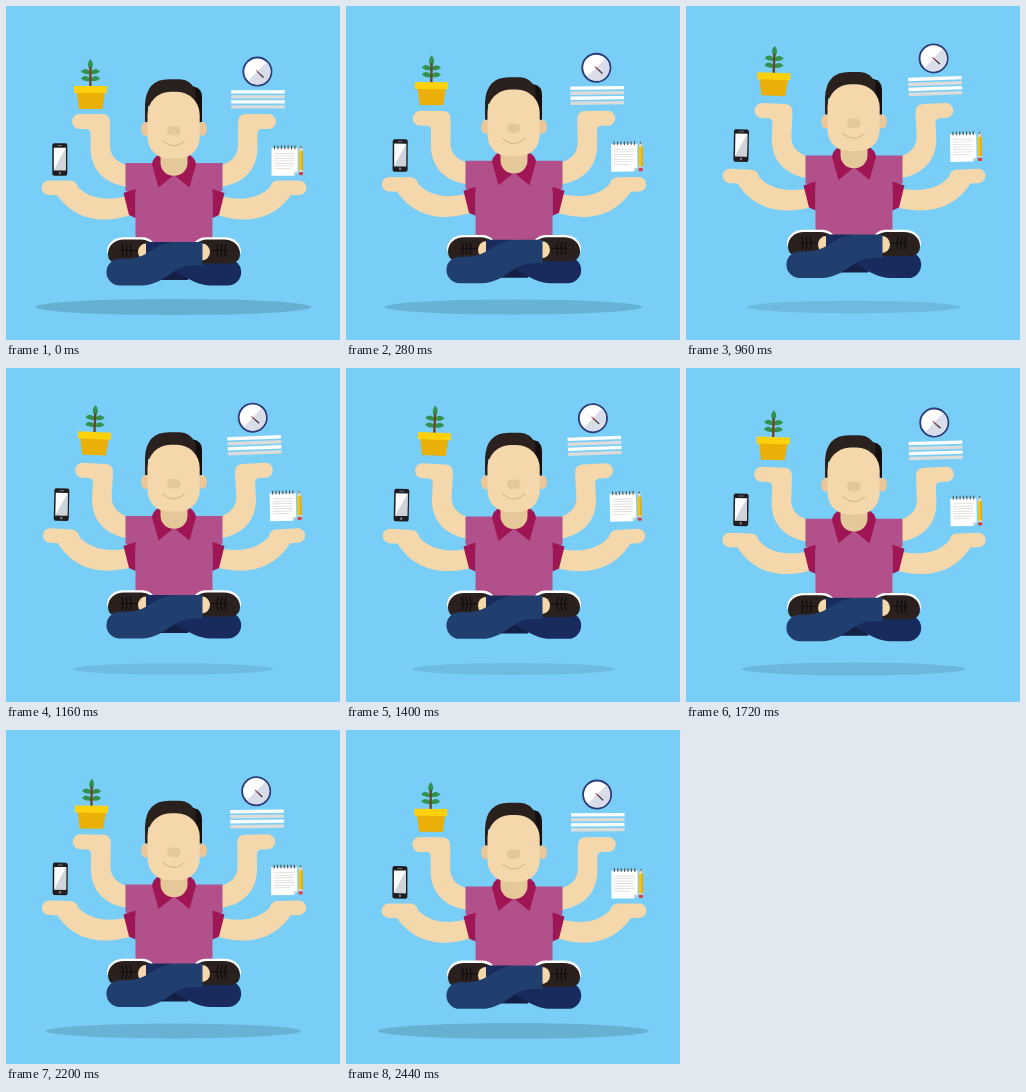
An HTML page with a canvas that plays this animation: 334x334 px, repeating every 2.52 s.

```html
<!DOCTYPE html>
<html lang="en">
<head>
<meta charset="utf-8">
<title>Multitasking meditation</title>
<style>
  html, body { margin: 0; width: 100%; height: 100%; overflow: hidden; background: #79cef7; }
  canvas { display: block; width: 100vw; height: 100vh; }
</style>
</head>
<body>
<canvas id="stage"></canvas>
<script>
const SIZE = 334, LOOP = 2520, STEP = 40, MID = 168, SWING = 0.065;
const SKIN = '#f4d7aa', SKIN_DARK = '#e5c89a', HAIR = '#2a211f';
const SHIRT = '#b1508a', COLLAR = '#a01553', JEANS = '#203f6e', JEANS_DARK = '#182b5c';

const canvas = document.getElementById('stage');
const ctx = canvas.getContext('2d');
const ratio = window.devicePixelRatio || 1;
canvas.width = canvas.height = SIZE * ratio;

function fill(color, d) {
  ctx.fillStyle = color;
  ctx.fill(new Path2D(d));
}

function line(color, width, d) {
  ctx.strokeStyle = color;
  ctx.lineWidth = width;
  ctx.stroke(new Path2D(d));
}

function box(color, x, y, w, h, r = 0) {
  ctx.fillStyle = color;
  ctx.beginPath();
  ctx.roundRect(x, y, w, h, r);
  ctx.fill();
}

function oval(color, x, y, rx, ry = rx) {
  ctx.fillStyle = color;
  ctx.beginPath();
  ctx.ellipse(x, y, rx, ry, 0, 0, Math.PI * 2);
  ctx.fill();
}

function group(draw) {
  ctx.save();
  draw();
  ctx.restore();
}

function mirror(draw) {
  group(() => {
    ctx.translate(MID * 2, 0);
    ctx.scale(-1, 1);
    draw();
  });
}

function bothSides(draw) {
  draw();
  mirror(draw);
}

function turn(x, y, angle) {
  ctx.translate(x, y);
  ctx.rotate(angle);
  ctx.translate(-x, -y);
}

function upperArm() {
  fill(SKIN, 'M73.5 108H96Q104 108 104 117V139C104 151 112 157 124 160V181C100 179 84.5 165 84.5 141V128Q84.5 123 80 123H73.5A7.5 7.5 0 0 1 73.5 108Z');
}

function lowerArm() {
  fill(SKIN, 'M42.8 174.5H64Q70 174.5 72 181C82 192 102 197 128 188V208C100 218 70 216 51 189H42.8A7.25 7.25 0 0 1 42.8 174.5Z');
}

function plant() {
  const leaf = '#33904d';
  fill(leaf, 'M84.4 53Q89.5 59 84.4 64Q79.3 59 84.4 53Z');
  for (const y of [65.5, 72.5]) {
    fill(leaf, `M84.4 ${y + 2}Q79 ${y + 4} 74.8 ${y}Q79 ${y - 5} 84.4 ${y}Q90 ${y - 5} 94 ${y}Q90 ${y + 4} 84.4 ${y + 2}Z`);
  }
  box('#6b4524', 83.2, 61, 2.4, 20);
  fill('#ebb008', 'M70.5 86H99L96.5 103H73Z');
  box('#fdd20c', 68, 80, 33, 7);
}

function phone() {
  box('#1f1d1f', 46.3, 137.3, 15, 32.5, 2);
  box('#fbfbfb', 47.8, 141.7, 12, 22.6);
  fill('#d0d3da', 'M59.8 141.7V164.3H47.8Z');
  box('#77777b', 51.5, 139.2, 4.5, 0.9);
  oval('#77777b', 53.8, 167, 1.3);
}

function clock() {
  oval('#2c3d7a', 251.4, 65.6, 15);
  oval('#ffffff', 251.4, 65.6, 13.1);
  ctx.fillStyle = '#d9dde9';
  ctx.beginPath();
  ctx.arc(251.4, 65.6, 13.1, -Math.PI / 4, Math.PI * 3 / 4);
  ctx.fill();
  line('#302a35', 1.2, 'M251.4 65.6L257.5 71.5');
  line('#c4504f', 1, 'M250 64.2L254 68');
}

function papers() {
  for (let i = 0; i < 4; i++) {
    box(i % 2 ? '#dcdcda' : '#ffffff', 225.2, 84.2 + i * 5, 53.6, 3.3);
  }
}

function notebook() {
  fill('#ffffff', 'M265.5 142H291.7V166L288 169.7H265.5Z');
  fill('#cfd2d6', 'M291.7 166H288V169.7Z');
  for (let i = 0; i < 7; i++) {
    box('#d8d6d2', 268.3, 147 + i * 2.5, i === 6 ? 16 : 20, 0.7);
    box('#5b5348', 268 + i * 3.4, 139.2, 1.1, 4, 0.5);
  }
  box('#f9c513', 293, 145, 4, 20);
  box('#e4a60f', 295.5, 145, 1.5, 20);
  fill('#f2d5aa', 'M293 145L295 139.6L297 145Z');
  fill('#39302c', 'M294.2 141.7L295 139.6L295.8 141.7Z');
  box('#d9d9d9', 293, 164.3, 4, 1.7);
  box('#d8403f', 293, 166, 4, 3.3, 1);
}

// An arm swings about the shoulder; what it holds floats further and tilts less.
function lift(p, side, arm, shoulder, load) {
  group(() => {
    const x = side < 0 ? shoulder.x : MID * 2 - shoulder.x;
    turn(x, shoulder.y, -side * SWING * p);
    side < 0 ? arm() : mirror(arm);
    ctx.translate(side * 1.5 * p, -3.6 * p);
    turn(load.x, load.y, side * (SWING - shoulder.tilt) * p);
    load.draw();
  });
}

const UPPER = { x: 148, y: 166, tilt: 0.045 };
const LOWER = { x: 132, y: 200, tilt: 0.025 };

function drawArms(p) {
  lift(p, -1, upperArm, UPPER, { x: 84.4, y: 80, draw: plant });
  lift(p, 1, upperArm, UPPER, { x: 252, y: 80, draw() { clock(); papers(); } });
  lift(p, -1, lowerArm, LOWER, { x: 53.8, y: 153.5, draw: phone });
  lift(p, 1, lowerArm, LOWER, { x: 281, y: 155, draw: notebook });
}

function torso() {
  fill(SHIRT, 'M119.5 157H216.5V185L206.5 188V238H129.5V188L119.5 185Z');
  bothSides(() => fill(COLLAR, 'M117.5 187L129.5 183V212L123 209Z'));
  bothSides(() => fill(COLLAR, 'M154.5 148Q147 151 146 158L152.5 181.5L168 169V160Z'));
  box(SKIN_DARK, 154.5, 143, 27, 26.7, [0, 0, 13, 13]);
}

function head() {
  fill('#15100f', 'M183 80.5H187.5Q196 82 196 91V116H183Z');
  fill(HAIR, 'M139 116V99Q140 73.3 163 73.3H174Q184 73.5 189.5 84V100H142V116Z');
  bothSides(() => oval('#eac698', 139.5, 123, 4.5, 7));
  box(SKIN, 141.5, 85.7, 52.2, 66.8, [23, 23, 21, 21]);
  box(SKIN_DARK, 161, 120, 13.5, 9.3, 4.5);
  ctx.lineCap = 'round';
  line('#d9b888', 1.1, 'M157 134.8Q168 144.5 178.5 134.8');
  ctx.lineCap = 'butt';
}

function shoe() {
  fill('#ffffff', 'M101 247C100.5 237 108 231.2 118 231.2H136Q143 231.2 147 236V246Z');
  fill(HAIR, 'M102 248C102 239 109 233.5 118 233.5H135Q141 233.5 145 237V257.5H110Q102 256 102 248Z');
  for (const x of [116, 120, 124]) line('#0f0c0d', 1.2, `M${x} 238Q${x + 2} 244 ${x} 251`);
  line('#0f0c0d', 0.9, 'M114 244.5H131');
  oval(SKIN, 140, 246, 8, 8.5);
}

function legs() {
  shoe();
  fill('#141f45', 'M150 262L168 256L186 262L182 274H154Z');
  fill(JEANS_DARK, 'M140 236H166C183 239 198 253 222 253A13.2 13.2 0 0 1 222 279.4H205C182 279.4 168 258 140 255Z');
  mirror(shoe);
  fill(JEANS, 'M113.7 252.8H121C143 252.8 148 236 171 236H196.5V259.5H186C166 260 158 279.4 136 279.4H113.7A13.3 13.3 0 0 1 113.7 252.8Z');
}

function render(now) {
  const time = Math.min(Math.floor((now % LOOP) / STEP) * STEP, LOOP - 2 * STEP);
  const p = 1 - Math.abs(time / (LOOP / 2) - 1);
  ctx.setTransform(ratio, 0, 0, ratio, 0, 0);
  ctx.fillStyle = '#79cef7';
  ctx.fillRect(0, 0, SIZE, SIZE);

  const spread = 138 - 41 * p;
  oval(`rgba(40, 75, 85, ${0.24 - 0.12 * p})`, 167.5, 301, spread, spread * 0.058);

  group(() => {
    ctx.translate(0, -9.7 * p);
    drawArms(p);
    torso();
    head();
    legs();
  });
}

const start = performance.now();
function tick() {
  render(performance.now() - start);
  requestAnimationFrame(tick);
}
tick();
</script>
</body>
</html>
```
